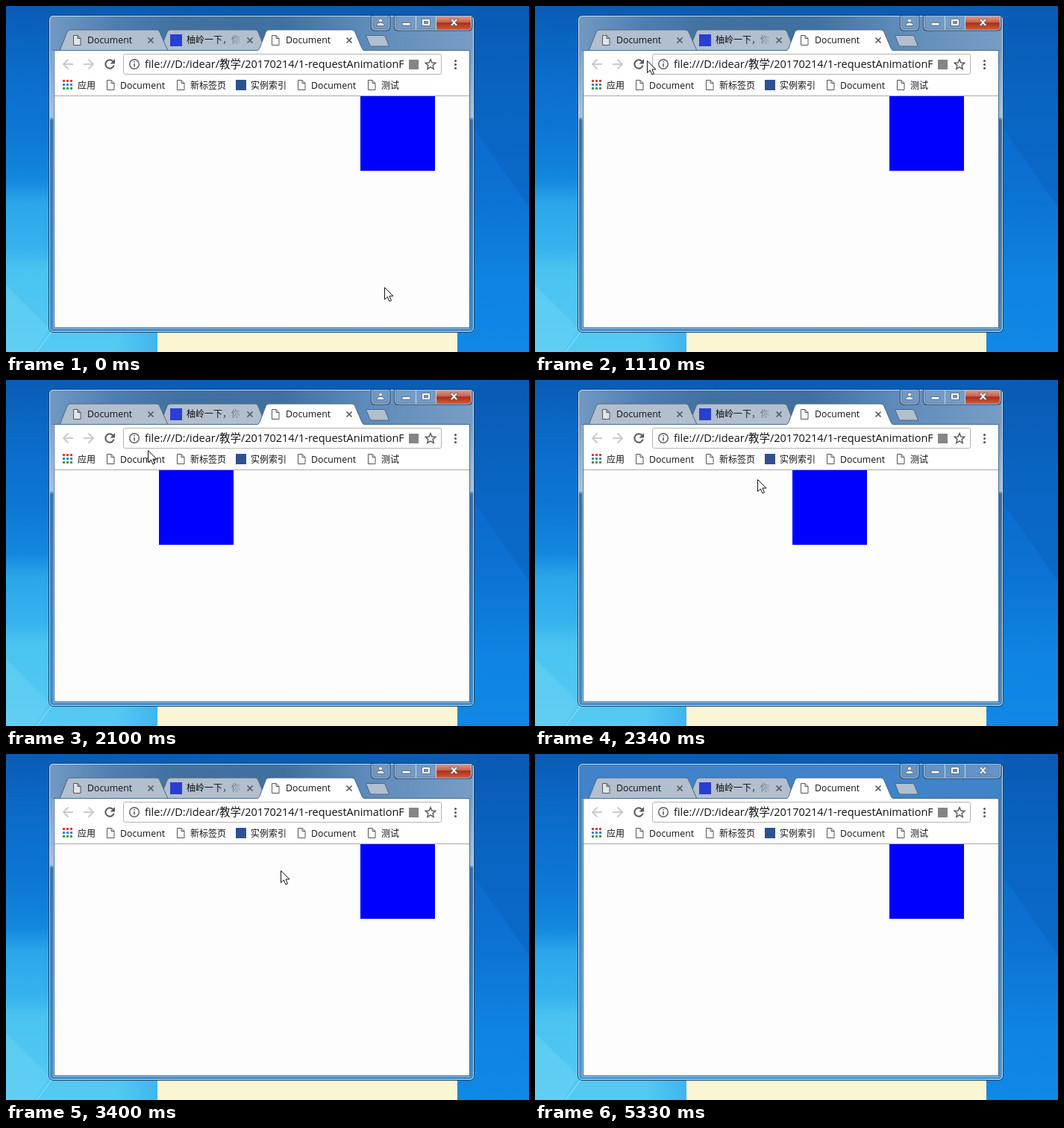
These frames come from a looping animation (701 by 464 pixels, 5430 ms). An HTML page:

```html
<!DOCTYPE html>
<html lang="zh">
<head>
<meta charset="utf-8">
<style>
  html, body { margin: 0; width: 100%; height: 100%; overflow: hidden; background: #0c70d0; }
  svg { display: block; width: 701px; height: 464px; }
  text { font: 12.3px "Open Sans", "Noto Sans CJK SC", "Noto Sans CJK", sans-serif; fill: #111; }
  .zh { font-size: 12px; }
  .url { font-size: 14.5px; }
  .line { fill: none; stroke: #5a5a5a; stroke-width: 2; }
  .tab { fill: #b1bfce; stroke: #4a6685; }
  .off .glow, .off .red { display: none; }
</style>
</head>
<body>
<svg viewBox="0 0 701 464">
  <defs>
    <linearGradient id="sky" x2="0" y2="1">
      <stop offset="0" stop-color="#0a5cb4"/><stop offset=".25" stop-color="#0b69c8"/>
      <stop offset=".55" stop-color="#0c72d3"/><stop offset=".8" stop-color="#0f84e2"/>
      <stop offset="1" stop-color="#1088e6"/>
    </linearGradient>
    <linearGradient id="left" x2="0" y2="1">
      <stop offset="0" stop-color="#0c6cca" stop-opacity="0"/><stop offset=".35" stop-color="#0d76d4"/>
      <stop offset=".5" stop-color="#1387de"/><stop offset=".57" stop-color="#2aa6ea"/>
      <stop offset=".7" stop-color="#36b3ee"/><stop offset=".76" stop-color="#4ac3f1"/>
      <stop offset="1" stop-color="#55caf2"/>
    </linearGradient>
    <linearGradient id="fadeRight">
      <stop offset=".45" stop-color="#fff"/><stop offset="1" stop-color="#fff" stop-opacity="0"/>
    </linearGradient>
    <mask id="leftMask"><rect width="330" height="464" fill="url(#fadeRight)"/></mask>
    <linearGradient id="frame" x2="0" y2="1">
      <stop offset="0" stop-color="#4083c8"/><stop offset=".33" stop-color="#3d85cd"/>
      <stop offset="1" stop-color="#3f9ade"/>
    </linearGradient>
    <linearGradient id="glow" x2="0" y2="1">
      <stop offset=".1" stop-color="#779dc4"/><stop offset=".32" stop-color="#a5c0dc"/>
      <stop offset=".33" stop-color="#3b6ea8"/><stop offset="1" stop-color="#3f8cc8"/>
    </linearGradient>
    <linearGradient id="title">
      <stop offset="0" stop-color="#7299c2"/><stop offset=".15" stop-color="#4f7fb1"/>
      <stop offset=".3" stop-color="#41719f"/><stop offset=".55" stop-color="#3f709f"/>
      <stop offset=".75" stop-color="#5e8bba"/><stop offset="1" stop-color="#779dc4"/>
    </linearGradient>
    <linearGradient id="red" x2="0" y2="1">
      <stop offset="0" stop-color="#d99a8c"/><stop offset=".45" stop-color="#c6604c"/>
      <stop offset=".5" stop-color="#ad2c18"/><stop offset="1" stop-color="#cf5a38"/>
    </linearGradient>
    <linearGradient id="titleFade" gradientUnits="userSpaceOnUse" x1="285" x2="319">
      <stop offset="0" stop-color="#111"/><stop offset="1" stop-color="#111" stop-opacity="0"/>
    </linearGradient>
    <path id="doc" d="M.5.5h5.500l4 4v9h-9.500zM6 .5v4h4" fill="#fff" fill-opacity=".6" stroke="#555"/>
    <path id="x" class="line" d="M-3.500-3.500l7 7m0-7l-7 7" style="stroke-width:1.700"/>
    <path id="caption" d="M490.500 13v15q0 4 4 4h15q4 0 4-4V13M521.500 13v15q0 4 4 4h94q4 0 4-4V13"/>
  </defs>

  <!-- Desktop -->
  <rect width="701" height="464" fill="url(#sky)"/>
  <rect width="330" height="464" fill="url(#left)" mask="url(#leftMask)"/>
  <path d="M628 165l73 105V0h-73z" fill="#0956ae" opacity=".3"/>
  <path d="M0 464v-90l58 58-20 32z" fill="#8be0f6" opacity=".22"/>
  <path d="M41 464l24-32" stroke="#c8f2fb" opacity=".6"/>
  <rect x="203" y="62" width="402" height="402" fill="#faf5d3"/>

  <!-- Window frame -->
  <g id="win">
    <rect x="57.500" y="12.500" width="570" height="425" rx="6" fill="url(#frame)" stroke="#173a5e"/>
    <g class="glow">
      <rect x="58" y="13" width="569" height="424" rx="6" fill="url(#glow)"/>
      <path d="M58 60V19q0-6 6-6h557q6 0 6 6v41z" fill="url(#title)"/>
    </g>
    <rect x="58.500" y="13.500" width="568" height="423" rx="5" fill="none" stroke="#d3e8f7" opacity=".9"/>
    <path d="M63.500 60v372.500h558V60" fill="none" stroke="#d3e8f7" opacity=".6"/>

    <use href="#caption" fill="none" stroke="#28486b" stroke-width="3"/>
    <use href="#caption" fill="#7fa3c9" fill-opacity=".55" stroke="#c3d6e9"/>
    <path class="red" d="M577 14h46v14q0 3.500-4 3.500h-42z" fill="url(#red)"/>
    <path d="M549.500 14v18M576.500 14v18" stroke="#c3d6e9"/>
    <g fill="#fff" stroke="#38506c" stroke-width=".7">
      <path d="M531 22.500h11v3.500h-11z"/>
      <path d="M557.500 17.500h11v9h-11zM560.500 20.500v3h5v-3z" fill-rule="evenodd"/>
      <path d="M595 17.500h3.500l2 2.500 2-2.500h3.500l-3.800 4.500 3.800 4.500h-3.500l-2-2.500-2 2.500H595l3.800-4.500z"/>
      <circle cx="502" cy="19.500" r="2.500"/><path d="M497 26.500q0-4 5-4t5 4z"/>
    </g>
  </g>

  <!-- Tabs -->
  <path class="tab" d="M206 60l10-25q1-3 4-3h114q3 0 4 3l10 25z"/>
  <path class="tab" d="M72 60l10-25q1-3 4-3h116q3 0 4 3l11 25z"/>
  <path class="tab" d="M482.500 39.500h23q2 0 3 2l5 12.500h-23q-2 0-3-2z"/>
  <rect x="64.500" y="59.500" width="557" height="372" fill="#fff" stroke="#426a91"/>
  <path d="M335 60.500q4-1 5-4l8-21q1-3.500 4-3.500h112q3 0 4 3.500l9 21q1 3 5 4z" fill="#fff" stroke="#4a6685"/>
  <rect x="65" y="60" width="556" height="371" fill="#fdfdfd"/>
  <rect x="65" y="60" width="556" height="60" fill="#fff"/>
  <path d="M65 120.500h556" stroke="#a9a9a9"/>

  <use href="#doc" x="90" y="39"/><text x="109" y="50">Document</text>
  <rect x="220" y="38" width="16" height="16" fill="#2a3fd2"/>
  <text class="zh" x="242" y="50" style="fill:url(#titleFade)">柚岭一下，你</text>
  <use href="#doc" x="356" y="39"/><text x="375" y="50">Document</text>
  <use href="#x" x="194" y="46"/><use href="#x" x="327" y="46"/><use href="#x" x="460" y="46"/>

  <!-- Toolbar -->
  <circle id="press" cx="139" cy="78" r="19.500" fill="#e6e6e6"/>
  <path class="line" d="M90 78H77m6.500-6.500L77 78l6.500 6.500M104 78h13m-6.500-6.500L117 78l-6.500 6.500" style="stroke:#cbcbcb"/>
  <path class="line" d="M143.300 74.200A5.700 5.700 0 1 0 144.600 79.500"/>
  <path d="M146 71v6.500h-6.500z" fill="#5a5a5a"/>
  <rect x="157.500" y="64.500" width="426" height="27" rx="2" fill="#fff" stroke="#b3b3b3"/>
  <circle class="line" cx="172" cy="78" r="6.300" style="stroke-width:1.400"/>
  <path d="M172 77v4.500M172 74v1.600" stroke="#5a5a5a" stroke-width="1.600"/>
  <svg x="186" y="64" width="347" height="28"><text class="url" y="19">file:///D:/idear/教学/20170214/1-requestAnimationF</text></svg>
  <rect x="540" y="72" width="13" height="13" fill="#858585"/>
  <path d="M569 71.500l1.900 4.500 4.900.4-3.700 3.200 1.100 4.800-4.200-2.600-4.200 2.600 1.100-4.800-3.700-3.200 4.900-.4z" class="line" style="stroke-width:1.400"/>
  <path d="M602.500 73.500v0m0 5v0m0 5v0" class="line" style="stroke-width:3.200;stroke-linecap:round"/>

  <!-- Bookmarks -->
  <rect id="hover" x="224" y="97" width="77" height="20" rx="2" fill="#efefef"/>
  <g fill="none" stroke-width="3" stroke-dasharray="3 2">
    <path d="M76 100.500h13" stroke="#e0402f"/>
    <path d="M76 105.500h13" stroke="#3f7de0"/>
    <path d="M76 110.500h13" stroke="#2f9e57"/>
  </g>
  <text class="zh" x="96" y="111">应用</text>
  <use href="#doc" x="135" y="99"/><text x="153" y="111">Document</text>
  <use href="#doc" x="229" y="99"/><text class="zh" x="247" y="111">新标签页</text>
  <rect x="308" y="99" width="14" height="14" fill="#2f5191"/>
  <text class="zh" x="328" y="111">实例索引</text>
  <use href="#doc" x="391" y="99"/><text x="409" y="111">Document</text>
  <use href="#doc" x="485" y="99"/><text class="zh" x="503" y="111">测试</text>

  <rect id="box" y="121" width="100" height="100" fill="#00f"/>
  <path id="cursor" d="M.5.500v16l3.800-3.500 2.600 6 2.600-1.100-2.600-5.900h5z" fill="#fff" stroke="#111"/>
</svg>
<script>
  const $ = id => document.getElementById(id);
  const LOOP = 5430, TICK = 136; // the screen refreshes once per tick
  const RELOAD = 13, GONE = 33, INACTIVE = 39; // ticks

  // Corners of the pointer's path: [tick, x, y]
  const path = [
    [0, 507, 377], [2, 317, 207], [4, 258, 132], [6, 184, 78], [8, 150, 73], [10, 136, 75],
    [14, 136, 75], [17, 298, 133], [25, 368, 156], [27, 414, 171], [30, 546, 283], [GONE, 606, 440]
  ];

  function pointerAt(n) {
    const i = path.findIndex(p => p[0] > n);
    const [n0, x0, y0] = path[i - 1], [n1, x1, y1] = path[i];
    const u = (n - n0) / (n1 - n0);
    return [x0 + (x1 - x0) * u, y0 + (y1 - y0) * u].map(Math.round);
  }

  const boxAt = n => n < RELOAD ? 475 : Math.min(475, Math.max(85, 70 * n - 845));
  const show = (id, on) => $(id).style.display = on ? '' : 'none';

  function draw() {
    const n = Math.floor(performance.now() % LOOP / TICK);
    show('cursor', n < GONE);
    if (n < GONE) $('cursor').setAttribute('transform', `translate(${pointerAt(n)})`);
    $('box').setAttribute('x', boxAt(n));
    show('press', Math.abs(n - RELOAD) <= 1);
    show('hover', n === 5 || n === 6);
    $('win').classList.toggle('off', n >= INACTIVE);
    requestAnimationFrame(draw);
  }
  draw();
</script>
</body>
</html>
```
